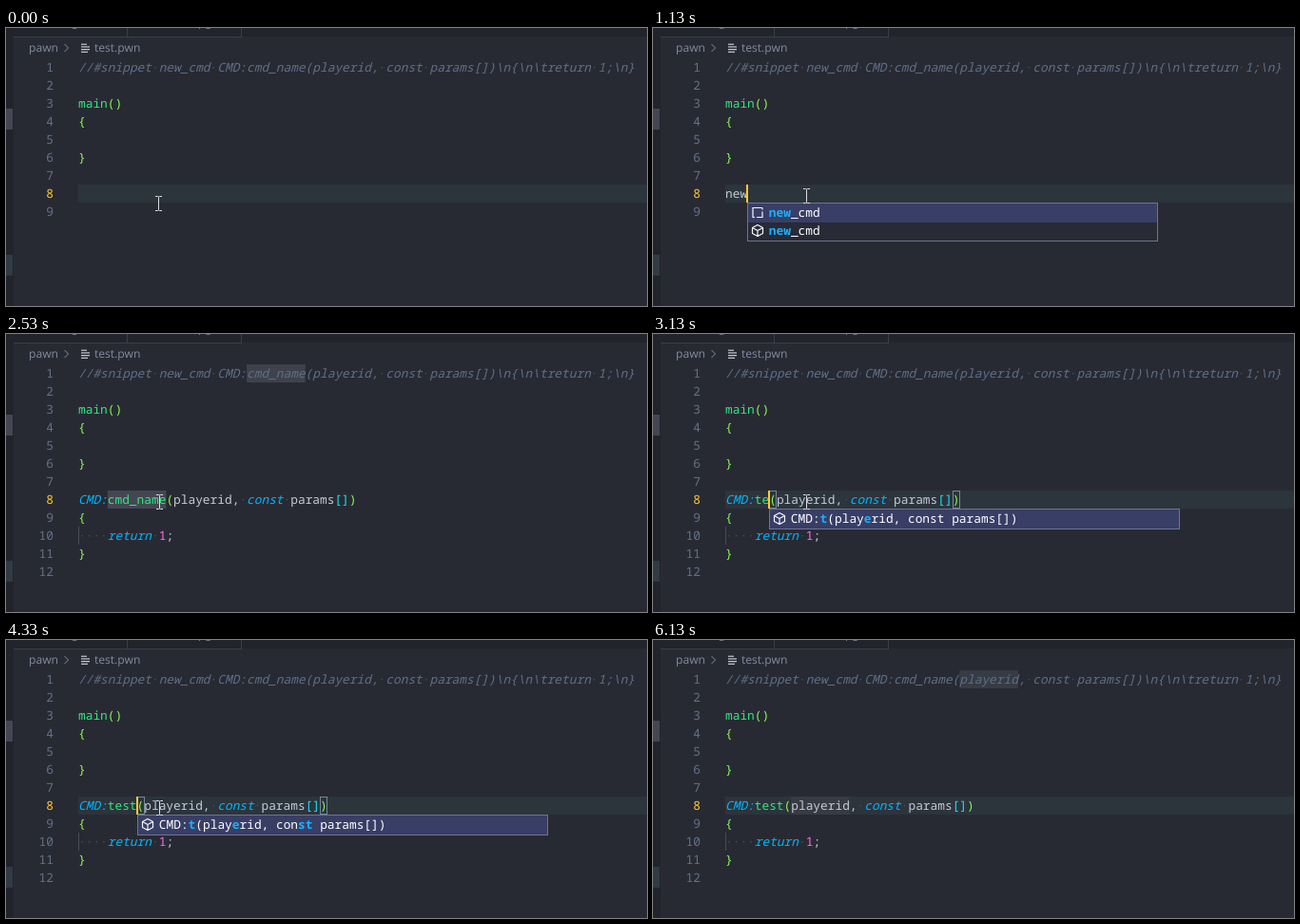
An HTML page for the animation above (6190 ms loop, 674x293 px).

```html
<!DOCTYPE html>
<html lang="en">
<head>
<meta charset="utf-8">
<title>Editor snippet</title>
<style>
  html, body { margin: 0; width: 100%; height: 100%; overflow: hidden; background: #282a33; }
  svg { display: block; width: 674px; height: 293px; }
  text { white-space: pre; font: 12.83px "Noto Sans Mono", "DejaVu Sans Mono", monospace; text-rendering: geometricPrecision; }
  .ui { font: 12.1px "Open Sans", "Noto Sans", sans-serif; fill: #808ba0; }
  .it { font-style: italic; }
  .mid { font-weight: 500; }
  .hit { font-weight: 600; fill: #18b0ff; }
</style>
</head>
<body>
<svg viewBox="0 0 674 293">
  <g id="frame"></g>
  <g id="code"></g>
  <path id="mouse" d="M-3.5-7.5h2.5q1 0 1 1q0-1 1-1h2.5M0-6.5v13M-3.5 7.5h2.5q1 0 1-1q0 1 1 1h2.5" fill="none" stroke="#dcdce0"/>
</svg>
<script>
const LOOP = 6190, X0 = 76, Y0 = 32, CW = 7.698, LH = 19;
const C = {
  text: '#c5cad5', dim: '#5f6f88', dot: '#444b59', green: '#34e67f', lime: '#86fb50',
  teal: '#1fe0ee', blue: '#00b6ff', pink: '#ff68f0', caret: '#ffcb2e', gutter: '#627189'
};
const $ = id => document.getElementById(id);
const colX = c => X0 + c * CW;
const rowY = r => Y0 + (r - 1) * LH;
const rect = (x, y, w, h, fill, more = '') =>
  `<rect x="${x}" y="${y}" width="${w}" height="${h}" fill="${fill}" ${more}/>`;
const text = (x, y, s, fill, more = '') => `<text x="${x}" y="${y}" fill="${fill}" ${more}>${s}</text>`;
const between = (t, a, b) => t >= a && t < b;

// Draws words at their columns and a faint dot for each space.
function put(row, col, s, fill, style = '') {
  const y = rowY(row) + 14;
  let out = '';
  for (const m of s.matchAll(/ |[^ ]+/g)) {
    const x = colX(col + m.index);
    out += m[0] === ' ' ? text(x, y, '·', C.dot) : text(x, y, m[0], fill, `class="${style}"`);
  }
  return out;
}

function line(row, parts) {
  let col = 0, out = '';
  for (const [s, fill, style] of parts) {
    out += put(row, col, s, fill, style);
    col += s.length;
  }
  return out;
}

const mark = (row, col, n, fill) => rect(colX(col), rowY(row), n * CW, LH, fill);
const bracketBox = (row, col) =>
  rect(Math.round(colX(col)) + .5, rowY(row) + .5, 7, LH - 1, 'none', 'stroke="#74889c"');
const caretAt = (row, col) => rect(Math.max(X0, Math.round(colX(col) - 1)), rowY(row), 2, LH, C.caret);

const cube = (x, y) => `<path transform="translate(${x} ${y})" d="M0-6L5.5-3V3L0 6L-5.5 3V-3ZM-5.5-3L0 0L5.5-3M0 0V6" fill="none" stroke="#f4f5fa" stroke-width="1.2" stroke-linejoin="round"/>`;
const page = (x, y) => rect(x - 5, y - 5, 10, 10, 'none', 'stroke="#f4f5fa" stroke-width="1.2" stroke-dasharray="10 0 2 2"');

// Items are [icon, label, matched column indexes].
function popup(col, items) {
  const x = Math.round(colX(col)), y = rowY(9), h = items.length * LH + 2;
  let out = rect(x + .5, y + .5, 431, h, '#282a36', 'stroke="#6b7690"');
  items.forEach(([icon, label, hits], i) => {
    const top = y + 1 + i * LH;
    if (!i) out += rect(x + 1, top, 430, LH + 1, '#393e66');
    out += icon(x + 11, top + 9.5);
    const spans = [...label].map((ch, k) => hits.includes(k) ? `<tspan class="hit">${ch}</tspan>` : ch).join('');
    out += text(x + 22.8, top + 13.5, spans, '#fff', 'class="mid"');
  });
  return out;
}

function frame() {
  const bar = '#22242b', edge = '#3b3e4a';
  let out = rect(0, 0, 674, 293, '#282a33') + rect(0, 0, 674, 9, bar) + rect(0, 0, 8, 293, bar);
  out += rect(8, 9, 240, 1, edge) + rect(127, 0, 1, 10, edge) + rect(247, 0, 1, 10, edge);
  out += rect(0, 85, 7, 22, '#444653') + rect(0, 239, 7, 22, '#303b44');
  out += text(69, -2, 'g', '', 'class="ui"') + text(202, -2, 'pg', '', 'class="ui"');
  out += text(24, 25, 'pawn', '', 'class="ui"') + text(93, 25, 'test.pwn', '', 'class="ui"');
  out += '<path d="M61.5 17l4 4l-4 4" fill="none" stroke="#808ba0"/>';
  [6, 9, 9, 7].forEach((w, i) => out += rect(79, 16.6 + i * 2.7, w, 1.2, '#c4c9d2'));
  return out;
}

function typed(t) {
  if (t < 870) return '';
  return 'new'.slice(0, t < 930 ? 1 : t < 1000 ? 2 : 3);
}

function command(t) {
  if (t < 3000) return 'cmd_name';
  return 'test'.slice(0, t < 3130 ? 1 : t < 3200 ? 2 : t < 3330 ? 3 : 4);
}

function code(t) {
  const expanded = t >= 1670;
  const name = command(t), end = 4 + name.length, close = end + 25;
  const active = between(t, 1670, 2400) ? 11 : 8;
  const picked = between(t, 2530, 3000) || between(t, 4930, 6070);
  let out = '';

  if (!picked) out += rect(X0, rowY(active), 674 - X0, LH, '#2c343c');
  if (between(t, 2530, 3000)) out += mark(1, 23, 8, '#3f424d') + mark(8, 4, 8, '#444753');
  if (t >= 4930) {
    const tone = t < 6070 ? '#40434d' : '#373b44';
    out += mark(1, 32, 8, tone) + mark(8, 9, 8, tone);
  }

  for (let n = 1; n <= (expanded ? 12 : 9); n++) {
    const on = n === active;
    out += text(50, rowY(n) + 14, n, on ? C.caret : C.gutter, `text-anchor="end"${on ? ' font-weight="600"' : ''}`);
  }

  out += put(1, 0, String.raw`//#snippet new_cmd CMD:cmd_name(playerid, const params[])\n{\n\treturn 1;\n}`, C.dim, 'it');
  out += line(3, [['main', C.green], ['()', C.lime, 'mid']]);
  out += put(4, 0, '{', C.lime, 'mid') + put(6, 0, '}', C.lime, 'mid');

  if (!expanded) {
    const word = typed(t);
    out += put(8, 0, word, C.text);
    if (t >= 470) out += caretAt(8, word.length);
    if (t >= 1130) out += popup(3, [[page, 'new_cmd', [0, 1, 2]], [cube, 'new_cmd', [0, 1, 2]]]);
    return out;
  }

  out += line(8, [['CMD:', C.blue, 'it'], [name, C.green], ['(', C.lime, 'mid'], ['playerid, ', C.text],
    ['const', C.blue, 'it'], [' params', C.text], ['[]', C.teal, 'mid'], [')', C.lime, 'mid']]);
  out += put(9, 0, '{', C.lime, 'mid') + put(11, 0, '}', C.lime, 'mid');
  out += rect(X0, rowY(10), 1, LH, '#474c59');
  out += line(10, [['    ', C.dot], ['return', C.blue, 'it'], [' ', C.dot], ['1', C.pink, 'mid'], [';', C.text]]);

  if (between(t, 1730, 2400)) out += bracketBox(9, 0) + bracketBox(11, 0);
  if (between(t, 3000, 6070)) out += bracketBox(8, end) + bracketBox(8, close);

  if (t < 2130) out += caretAt(11, 1);
  else if (between(t, 2400, 2530)) out += caretAt(8, 11);
  else if (between(t, 3000, 3870) || between(t, 4330, 4670)) out += caretAt(8, end);

  if (between(t, 3070, 4670)) {
    const hits = [4, 10, 19, 20].slice(0, name.length);
    out += popup(end, [[cube, 'CMD:t(playerid, const params[])', hits]]);
  }
  return out;
}

function mouseAt(t) {
  if (t < 5200) {
    const k = Math.min(1, Math.max(0, (t - 70) / 330));
    return [160 + k, 185 - 8 * k * (2 - k)];
  }
  const k = Math.min(1, (t - 5200) / 470);
  return [161 - 19 * k, 177 + 126 * k * k];
}

let last = '';
function draw(t) {
  const now = code(t);
  if (now !== last) $('code').innerHTML = last = now;
  const [x, y] = mouseAt(t).map(Math.round);
  $('mouse').setAttribute('transform', `translate(${x + .5} ${y})`);
}

$('frame').innerHTML = frame();
const start = performance.now();
function tick() {
  draw((performance.now() - start) % LOOP);
  requestAnimationFrame(tick);
}
tick();
</script>
</body>
</html>
```
